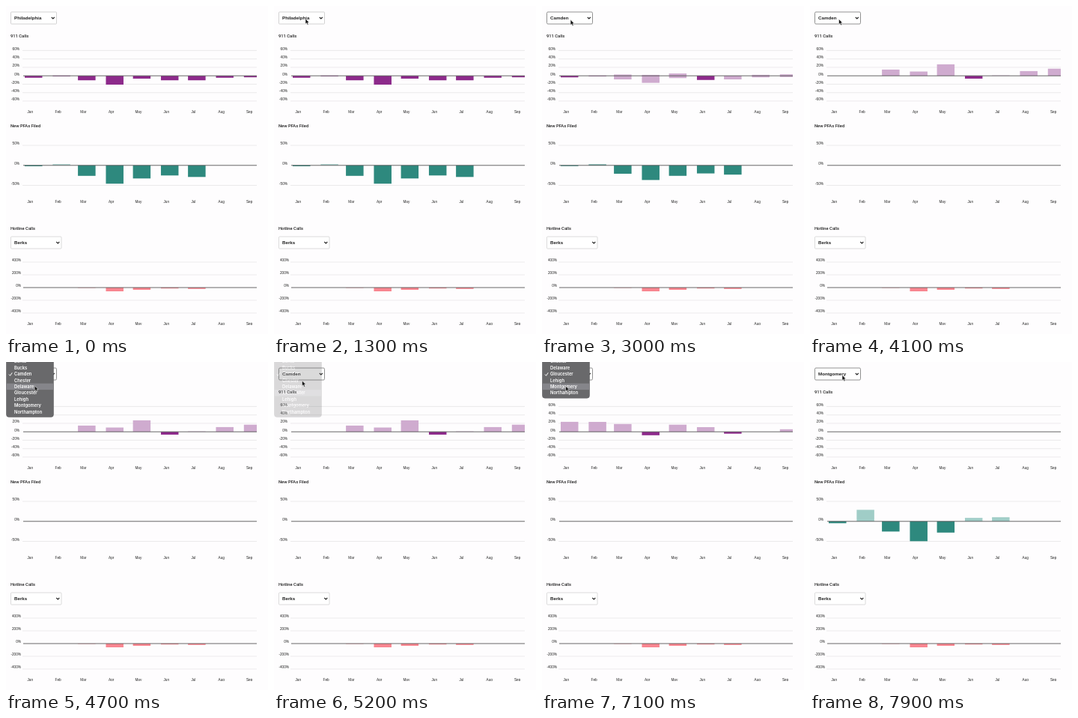
Write an HTML page that moves like this. It is 350 px wide and 438 px high and loops after 8000 ms.

```html
<!DOCTYPE html>
<html lang="en">
<head>
<meta charset="utf-8">
<title>County calls</title>
<style>
html, body { margin: 0; width: 100%; height: 100%; overflow: hidden; background: #fefdfe; }
svg { display: block; width: 350px; height: 438px; }
.title { font: 500 5.8px Roboto, sans-serif; fill: #222; }
.axis { font: 4.7px "Liberation Sans", sans-serif; fill: #222; }
.pick { font: bold 6.2px "Liberation Sans", sans-serif; fill: #222; }
.item { font: 600 5.8px Inter, sans-serif; fill: #fff; }
</style>
</head>
<body>
<svg id="stage" viewBox="0 0 350 438"></svg>
<script>
const LOOP = 8000, GROW = 750, ROW = 8.43;
const MONTHS = ["Jan", "Feb", "Mar", "Apr", "May", "Jun", "Jul", "Aug", "Sep"];
const DAYS = [0, 31, 59, 90, 120, 151, 181, 212, 243].map(d => d * 1.205);
const COUNTIES = ["Philadelphia", "Berks", "Bucks", "Camden", "Chester", "Delaware",
  "Gloucester", "Lehigh", "Montgomery", "Northampton"];
const FLAT = Array(9).fill(0);

// bar heights in pixels, up is positive
const CALLS = {
  Philadelphia: [-2.6, -0.8, -6, -11.8, -3.8, -6, -6, -2.6, -2],
  Camden: [0, 0, 8.3, 5.7, 15.3, -3.8, 0.5, 6.3, 9.5],
  Gloucester: [13.3, 13.2, 10.4, -4.6, 9.5, 6.2, -2.5, 0, 3.4],
  Montgomery: FLAT
};
const FILED = {
  Philadelphia: [-1.2, 1.6, -14, -24.5, -17.5, -13.5, -15.5, 0, 0],
  Camden: FLAT,
  Gloucester: FLAT,
  Montgomery: [-2.5, 15.4, -13.6, -26.5, -15, 4.6, 5.5, 0, 0]
};
const HOTLINE = [0, 0, -0.4, -5, -3, -1.2, -1.8, 0, 0];

// when each menu opens and closes, and when the label and the bars follow
const PICKS = [
  { from: "Philadelphia", to: "Camden", open: 1500, close: 2450, label: 2620, bars: 2724 },
  { from: "Camden", to: "Gloucester", open: 4250, close: 5080, label: 5250, bars: 5350 },
  { from: "Gloucester", to: "Montgomery", open: 6200, close: 7110, label: 7240, bars: 7170 }
];
const PATH = [
  [900, 52, 3], [1300, 42, 17], [1600, 42, 17], [2150, 44, 25], [2250, 44, 25], [2400, 40, 41],
  [2480, 40, 41], [2800, 38, 18.5], [4100, 38.5, 17.5], [4400, 38.5, 17.5], [4900, 38, 41],
  [5090, 38, 41], [5200, 37.5, 25], [5400, 37, 18], [6300, 35, 18], [6900, 31.5, 32],
  [7150, 31.5, 32], [7450, 43, 17.5]
];

const stage = document.getElementById("stage");
function add(tag, attrs, parent = stage) {
  const el = document.createElementNS("http://www.w3.org/2000/svg", tag);
  set(el, attrs);
  parent.append(el);
  return el;
}
function set(el, attrs) {
  for (const k in attrs) el.setAttribute(k, attrs[k]);
}
function text(str, x, y, cls, anchor = "start", parent = stage) {
  const el = add("text", { x, y, class: cls, "text-anchor": anchor }, parent);
  el.textContent = str;
  return el;
}

function makeChart(zero, step, labels, right, monthY, dark, light) {
  const mid = (labels.length - 1) / 2;
  labels.forEach((v, i) => {
    const y = zero + (i - mid) * step;
    if (v) add("path", { d: `M22 ${y}H335`, stroke: "#e4e3e4", "stroke-width": 0.7 });
    text(v + "%", right, y - 0.7, "axis", "end");
  });
  const bars = DAYS.map(d => add("rect", { x: 25 + d, width: Math.min(23.5, 310 - d) }));
  add("path", { d: `M23 ${zero}H335`, stroke: "#555", "stroke-width": 0.9 });
  MONTHS.forEach((m, i) => text(m, 32.3 + DAYS[i], monthY, "axis", "middle"));
  return (from, to, k) => bars.forEach((bar, i) => {
    const a = from[i], b = to[i];
    const top = Math.max(a, 0) * (1 - k) + Math.max(b, 0) * k;
    const height = Math.abs(a) * (1 - k) + Math.abs(b) * k;
    set(bar, { y: zero - top, height, fill: (k > 0 ? b : a) > 0 ? light : dark });
  });
}

function makeSelect(y, width, value) {
  const box = add("rect", { x: 6.5, y: y - 8, width, height: 16, rx: 1, fill: "#fff",
    stroke: "#d2d2d2", "stroke-width": 0.8 });
  const label = text(value, 11, y + 2.2, "pick");
  add("path", { d: `M${width - 0.2} ${y - 1}l2 2l2 -2`, fill: "none", stroke: "#222", "stroke-width": 1.1 });
  return { box, label };
}

const county = makeSelect(16, 61, "Philadelphia");
text("911 Calls", 6, 42.2, "title");
const drawCalls = makeChart(93.2, 11.25, [60, 40, 20, 0, -20, -40, -60], 18, 143.3, "#8d2a8b", "#cfabcf");
text("New PFAs Filed", 6, 162.2, "title");
const drawFiled = makeChart(212.8, 26.7, [50, 0, -50], 18, 263.2, "#2e897e", "#a0cdc7");
text("Hotline Calls", 6, 299.4, "title");
makeSelect(316, 67.5, "Berks");
const drawHotline = makeChart(376, 17, [400, 200, 0, -200, -400], 20, 426.3, "#f98690", "#f98690");
drawHotline(HOTLINE, HOTLINE, 0);
add("rect", { x: 0, y: 426, width: 350, height: 12, fill: "#fefdfe" });

const menu = add("g", {});
add("rect", { x: 0.5, y: -6.5, width: 63, height: ROW * 9 + 13.5, rx: 3.5, fill: "#69696b",
  stroke: "#555557", "stroke-width": 0.5 }, menu);
const hover = add("rect", { x: 0.8, width: 62.4, height: ROW, fill: "#85858a" }, menu);
COUNTIES.forEach((c, i) => text(c, 11, i * ROW + 2.1, "item", "start", menu));
const tick = add("path", { d: "M4 0l1.5 1.8l2.7 -4", fill: "none", stroke: "#fff", "stroke-width": 1 }, menu);
const cursor = add("path", { d: "M0 0V7L1.6 5.6L2.7 8.2L4 7.6L2.9 5.1H5Z", fill: "#111",
  stroke: "#fff", "stroke-width": 0.5 });

const clamp = v => Math.min(1, Math.max(0, v));
const ease = t => t < 0.5 ? 4 * t ** 3 : 1 - 4 * (1 - t) ** 3;

function pointer(t) {
  const i = PATH.findIndex(p => p[0] > t);
  if (i < 0) return PATH[PATH.length - 1].slice(1);
  if (i === 0) return PATH[0].slice(1);
  const [t0, x0, y0] = PATH[i - 1], [t1, x1, y1] = PATH[i];
  const k = (t - t0) / (t1 - t0);
  return [x0 + (x1 - x0) * k, y0 + (y1 - y0) * k];
}

function drawMenu(t, y) {
  const p = PICKS.find(q => t >= q.open && t < q.close + 160);
  menu.style.display = p ? "" : "none";
  if (!p) return;
  const selected = COUNTIES.indexOf(p.from);
  const over = t < p.close
    ? Math.min(9, Math.max(0, selected + Math.round((y - 16) / ROW)))
    : COUNTIES.indexOf(p.to);
  set(menu, { transform: `translate(0 ${16 - selected * ROW})`, opacity: 1 - clamp((t - p.close) / 160) });
  set(hover, { y: (over - 0.5) * ROW });
  set(tick, { transform: `translate(0 ${selected * ROW + 0.5})` });
}

function draw(t) {
  const [x, y] = pointer(t);
  cursor.style.display = t < PATH[0][0] ? "none" : "";
  set(cursor, { transform: `translate(${x} ${y})` });
  drawMenu(t, y);

  let name = "Philadelphia", step = { from: name, to: name, bars: 0 };
  for (const p of PICKS) {
    if (t >= p.label) name = p.to;
    if (t >= p.bars) step = p;
  }
  county.label.textContent = name;
  set(county.box, { stroke: t < PICKS[0].open ? "#c8c8c8" : "#777", rx: t < PICKS[0].open ? 1 : 1.5 });
  const k = ease(clamp((t - step.bars) / GROW));
  drawCalls(CALLS[step.from], CALLS[step.to], k);
  drawFiled(FILED[step.from], FILED[step.to], k);
}

const start = performance.now();
function tickFrame(now) {
  draw(Math.max(0, now - start) % LOOP);
  requestAnimationFrame(tickFrame);
}
draw(0);
requestAnimationFrame(tickFrame);
</script>
</body>
</html>
```
